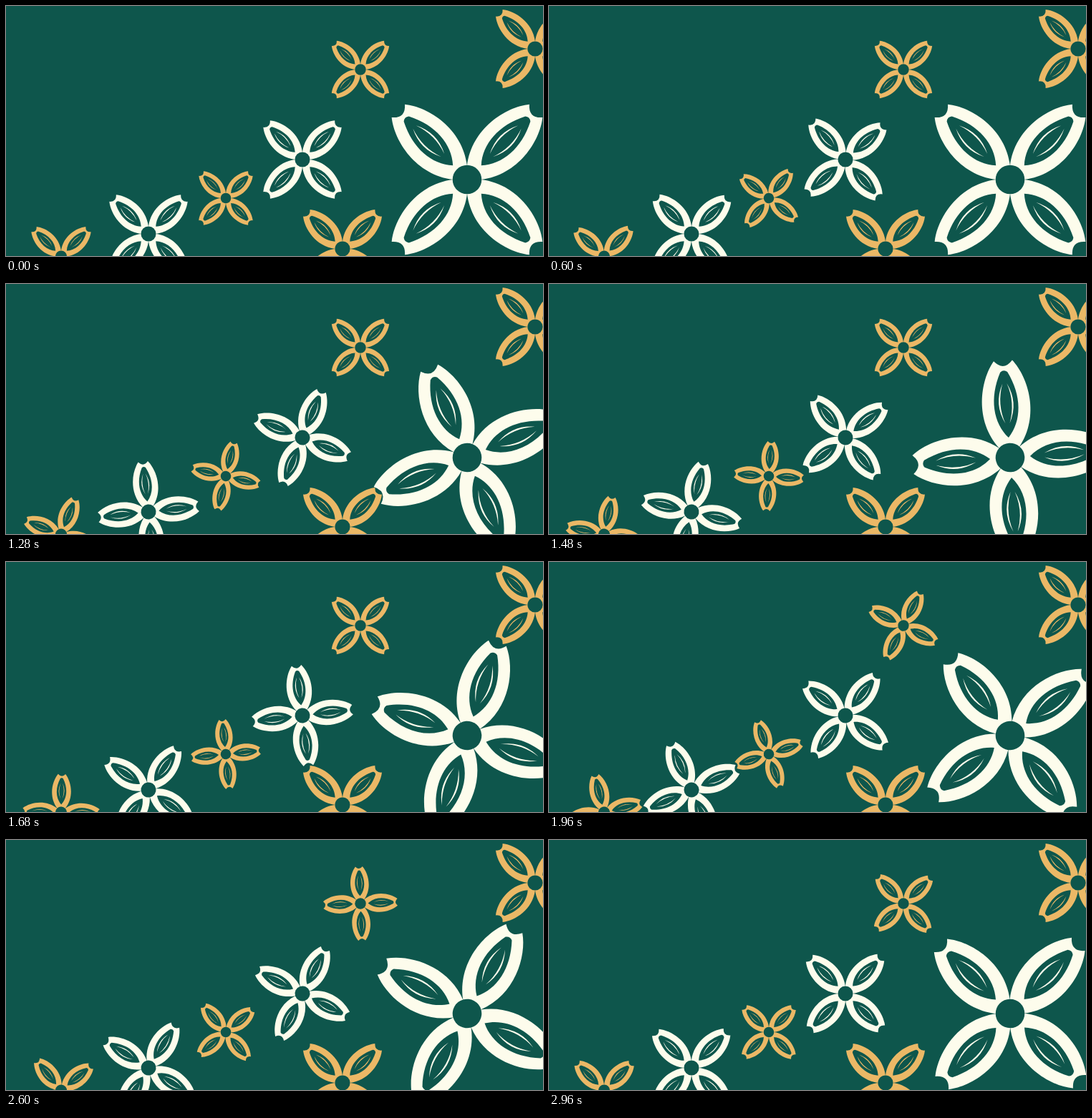
Animation, 750 px wide and 350 px high, one loop 3 s. Source, as an HTML page:

```html
<!DOCTYPE html>
<html lang="en">
<head>
<meta charset="utf-8">
<title>Turning blossoms</title>
<style>
  html, body { margin: 0; width: 100%; height: 100%; overflow: hidden; background: #0e564c; }
  svg { display: block; width: 100vw; height: 100vh; }
</style>
</head>
<body>
<svg id="stage" viewBox="0 0 750 350" preserveAspectRatio="xMidYMid slice"></svg>
<script>
const NS = 'http://www.w3.org/2000/svg';
const GROUND = '#0e564c', CREAM = '#fdfcec', GOLD = '#ebb866';
const LOOP = 3000, STEP = 40, END = 3040;

// One petal pointing right: outline, leaf cut-out and two crescent veins.
const vein = s => `M104 ${3 * s}Q76 ${17.5 * s} 48 ${3 * s}Q76 ${13 * s} 104 ${3 * s}Z`;
const PETAL =
  'M0 0L14 14C55 46 110 34 136 13Q121 0 136 -13C110 -34 55 -46 14 -14Z' +
  'M28 0C50 20 85 23 120 5Q124 0 120 -5C85 -23 50 -20 28 0Z' +
  vein(1) + vein(-1);

// turn: degrees covered between start and END, clockwise positive.
const flowers = [
  { x: 77,  y: 350.5, scale: .395, color: GOLD,  start: 360,  turn: -90 },
  { x: 199, y: 319,   scale: .519, color: CREAM, start: 500,  turn: 180 },
  { x: 307, y: 269,   scale: .358, color: GOLD,  start: 80,   turn: -90 },
  { x: 414, y: 215,   scale: .519, color: CREAM, start: 405,  turn: 270 },
  { x: 644, y: 243,   scale: 1,    color: CREAM, start: 760,  turn: 180 },
  { x: 495, y: 89,    scale: .381, color: GOLD,  start: 1680, turn: -180 },
  { x: 470, y: 340,   scale: .522, color: GOLD,  start: 0,    turn: 0 },
  { x: 739, y: 60,    scale: .522, color: GOLD,  start: 0,    turn: 0 }
];

function add(parent, tag, attrs) {
  const el = document.createElementNS(NS, tag);
  for (const key in attrs) el.setAttribute(key, attrs[key]);
  return parent.appendChild(el);
}

const stage = document.getElementById('stage');
add(stage, 'rect', { width: 750, height: 350, fill: GROUND });

for (const flower of flowers) {
  flower.el = add(stage, 'g', { fill: flower.color });
  for (let angle = 45; angle < 360; angle += 90) {
    add(flower.el, 'path', { d: PETAL, 'fill-rule': 'evenodd', transform: `rotate(${angle})` });
  }
  add(flower.el, 'circle', { r: 20.3, fill: GROUND });
}

const easeSine = p => (1 - Math.cos(Math.PI * p)) / 2;

function draw(time) {
  for (const { el, x, y, scale, start, turn } of flowers) {
    const progress = Math.min(1, Math.max(0, (time - start) / (END - start)));
    const angle = turn * easeSine(progress);
    el.setAttribute('transform', `translate(${x} ${y}) rotate(${angle}) scale(${scale})`);
  }
}

let origin;
function tick(now) {
  origin ??= now;
  const time = (now - origin) % LOOP;
  draw(Math.floor(time / STEP) * STEP);
  requestAnimationFrame(tick);
}
draw(0);
requestAnimationFrame(tick);
</script>
</body>
</html>
```
